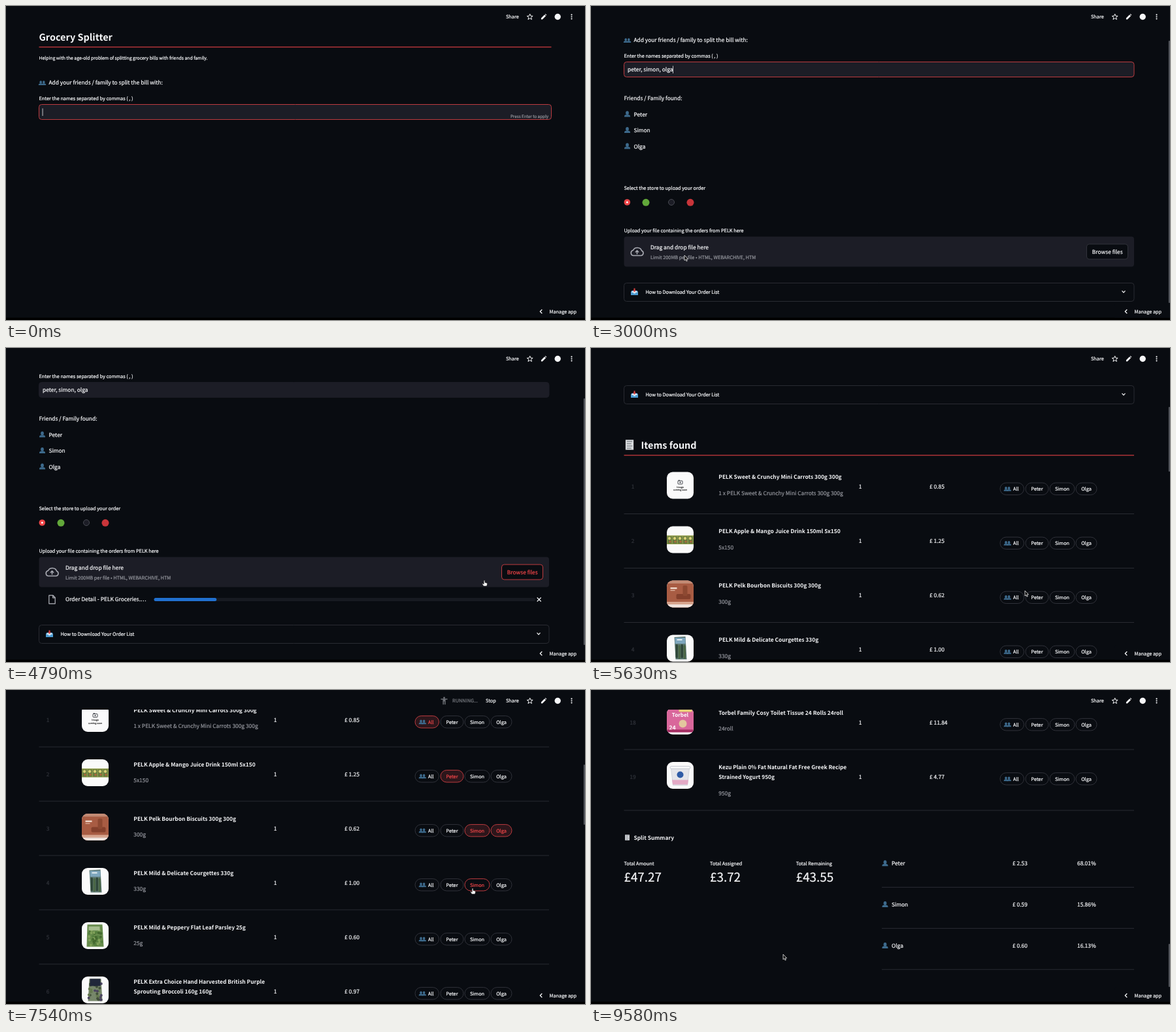
Animation of 886x480 px, one loop 9620 ms. Source, as an HTML page with a canvas:

```html
<!DOCTYPE html>
<html lang="en">
<head>
<meta charset="utf-8">
<title>Grocery Splitter</title>
<style>
html, body { margin: 0; width: 100%; height: 100%; overflow: hidden; background: #090c11; }
canvas { display: block; }
</style>
</head>
<body>
<canvas id="stage" width="886" height="480"></canvas>
<script>
const ctx = document.getElementById('stage').getContext('2d');
ctx.textRendering = 'geometricPrecision';
const LOOP = 9620, TAU = Math.PI * 2;
const FONT = '"Noto Sans CJK JP", "Noto Sans CJK SC", "Noto Sans CJK", "Open Sans", sans-serif';
const BG = '#090c11', PANEL = '#1c1d26', WHITE = '#f6f7f9', GRAY = '#92949b', LINE = '#292b32',
      EDGE = '#30323a', RED = '#ee4548', RED_EDGE = '#bd3b3f', RULE = '#b8363a', BLUE = '#3d6a8c';
const BODY = 9.37, SMALL = 8.2, TINY = 7.03, TITLE = 16.1;

// Type sizes are given for a face in which "name" is 2.377 em wide.
ctx.font = `100px ${FONT}`;
const fontScale = 237.7 / ctx.measureText('name').width;

const PEOPLE = ['Peter', 'Simon', 'Olga'];
const TYPED = PEOPLE.join(', ').toLowerCase();
const STORE = 'PELK';

const ITEMS = [
  ['PELK Sweet & Crunchy Mini Carrots 300g 300g', '1 x PELK Sweet & Crunchy Mini Carrots 300g 300g', '0.85'],
  ['PELK Apple & Mango Juice Drink 150ml 5x150', '5x150', '1.25'],
  ['PELK Pelk Bourbon Biscuits 300g 300g', '300g', '0.62'],
  ['PELK Mild & Delicate Courgettes 330g', '330g', '1.00'],
  ['PELK Mild & Peppery Flat Leaf Parsley 25g', '25g', '0.60'],
  ['PELK Extra Choice Hand Harvested British Purple|Sprouting Broccoli 160g 160g', '160g', '0.97'],
  ['PELK Ripe & Ready Avocados 2pk', '2pk', '1.65'],
  ['PELK Baby Plum Tomatoes 300g', '300g', '1.20'],
  ['PELK Free Range Large Eggs With|Golden Yolks 12pk', '12pk', '2.95'],
  ['PELK Semi Skimmed Milk 2l', '2l', '1.45'],
  ['PELK Mature Cheddar Cheese 400g', '400g', '3.10'],
  ['PELK Wholemeal Medium Sliced|Farmhouse Bread 800g', '800g', '1.30'],
  ['PELK Easy Cook Basmati Rice 1kg', '1kg', '2.20'],
  ['PELK Chicken Breast Fillets 600g', '600g', '4.35'],
  ['PELK Fresh Orange Juice With Juicy|Bits 1l', '1l', '2.40'],
  ['PELK Salted Butter 250g', '250g', '1.99'],
  ['PELK Porridge Oats With Mixed Berries|And Seeds 500g', '500g', '2.78'],
  ['Torbel Family Cosy Toilet Tissue 24 Rolls 24roll', '24roll', '11.84'],
  ['Kezu Plain 0% Fat Natural Fat Free Greek Recipe|Strained Yogurt 950g', '950g', '4.77']
].map(([title, note, price]) => ({ lines: title.split('|'), note, price }));

let nextCentre = 676;
for (const item of ITEMS) {
  item.y = nextCentre;
  item.bottom = item.y + (item.lines.length > 1 ? 51.5 : 41.5);
  nextCentre = item.bottom + 41.5;
}
const SCROLL_END = ITEMS[18].bottom - 184;

const PILLS = [['All', 626, 36.5], [PEOPLE[0], 665, 35], [PEOPLE[1], 702, 38], [PEOPLE[2], 742, 32]];
// time, row, pill
const CLICKS = [[6080, 0, 0], [6400, 1, 1], [6700, 2, 2], [7000, 2, 3], [7800, 3, 1]];

const SCROLL = [[2350, 0], [2800, 65], [4640, 65], [4720, 98], [5100, 98], [5600, 464],
  [7120, 464], [7400, 630.5], [8080, 630.5], [8950, SCROLL_END]];
const THUMB = [[2350, 30, 422], [2800, 53, 454], [4640, 53, 454], [4720, 77, 454], [5000, 77, 454],
  [5100, 45, 145], [5600, 90, 189], [7120, 90, 189], [7400, 114, 206], [8080, 114, 206], [8950, 388, 454]];
const POINTER = [[2080, 700, 100], [2210, 660, 146], [3000, 143, 381], [3150, 143, 381], [3650, 790, 372],
  [4300, 790, 372], [4790, 732, 355], [5100, 732, 355], [5630, 664, 371], [5750, 664, 371], [6050, 645, 213],
  [6110, 645, 213], [6370, 684, 296], [6430, 684, 296], [6670, 721, 379], [6730, 721, 379], [6970, 757, 379],
  [7150, 757, 379], [7540, 714, 303], [7760, 684, 298], [8150, 684, 298], [8950, 294, 404]];

function along(keys, t) {
  const i = keys.findIndex(k => k[0] > t);
  if (i === 0) return keys[0].slice(1);
  if (i < 0) return keys[keys.length - 1].slice(1);
  const a = keys[i - 1], b = keys[i];
  const e = (1 - Math.cos(Math.PI * (t - a[0]) / (b[0] - a[0]))) / 2;
  return a.slice(1).map((v, n) => v + (b[n + 1] - v) * e);
}

// y is the middle of the capitals; a hairline outline thickens the regular weight
function text(str, x, y, size = BODY, color = WHITE, weight = 400, align = 'left') {
  ctx.font = `${weight} ${size * fontScale}px ${FONT}`;
  ctx.fillStyle = ctx.strokeStyle = color;
  ctx.textAlign = align;
  ctx.fillText(str, x, y + size * 0.33);
  if (weight === 400) {
    ctx.lineWidth = 0.22;
    ctx.strokeText(str, x, y + size * 0.33);
  }
}
function rect(x, y, w, h, color) {
  ctx.fillStyle = color;
  ctx.fillRect(x, y, w, h);
}
function box(x, y, w, h, r, fill, stroke, width = 1) {
  ctx.beginPath();
  ctx.roundRect(x, y, w, h, r);
  paint(fill, stroke, width);
}
function disc(x, y, r, fill, stroke, width = 1) {
  ctx.beginPath();
  ctx.arc(x, y, r, 0, TAU);
  paint(fill, stroke, width);
}
function shape(d, x, y, fill, stroke, width = 1) {
  ctx.save();
  ctx.translate(x, y);
  const path = new Path2D(d);
  if (fill) { ctx.fillStyle = fill; ctx.fill(path); }
  if (stroke) { ctx.strokeStyle = stroke; ctx.lineWidth = width; ctx.lineJoin = 'round'; ctx.stroke(path); }
  ctx.restore();
}
function paint(fill, stroke, width) {
  if (fill) { ctx.fillStyle = fill; ctx.fill(); }
  if (stroke) { ctx.strokeStyle = stroke; ctx.lineWidth = width; ctx.stroke(); }
}

function person(x, y, k = 1) {
  ctx.beginPath();
  ctx.ellipse(x, y - 1.5 * k, 2.4 * k, 3 * k, 0, 0, TAU);
  paint(BLUE);
  box(x - 4.5 * k, y + 1.2 * k, 9 * k, 3.3 * k, [2.6 * k, 2.6 * k, 0, 0], BLUE);
}
function couple(x, y) {
  person(x - 2.3, y, 0.75);
  person(x + 2.3, y, 0.75);
}
function sheet(x, y, k) {
  rect(x - 3.6 * k, y - 4.5 * k, 7.2 * k, 9 * k, '#d9dcdf');
  for (let i = 0; i < 4; i++) rect(x - 2.5 * k, y + (i * 2 - 3.3) * k, (i % 2 ? 4 : 5) * k, 0.7 * k, '#777c82');
}
function inbox(x, y) {
  shape('M-5.5 0L-4 -2H4L5.5 0V5H-5.5Z', x, y, '#4d9cd2');
  shape('M-4 -1H4V1H2L1 2.5H-1L-2 1H-4Z', x, y, '#dfe8ee');
  shape('M-1 -5.5H1V-2.5H2.6L0 .3L-2.6 -2.5H-1Z', x, y, '#d9413f');
}
const chevronDown = (x, y) => shape('M-2.5 -1.3L0 1.3L2.5 -1.3', x, y, null, WHITE, 1.2);

function leaves(colors, seed, count) {
  for (let i = 0; i < count; i++) {
    const a = Math.sin(seed + i * 12.9) * 43758, b = Math.sin(seed + i * 78.2) * 9631;
    disc(-10 + (a - Math.floor(a)) * 20, -10 + (b - Math.floor(b)) * 25, 2, colors[i % colors.length]);
  }
}
const ART = {
  0() {
    box(-3.5, -7, 7, 5, 0.8, null, '#30343a', 0.9);
    disc(0, -4.5, 1.1, '#30343a');
    rect(-3, -8.2, 2.5, 1, '#30343a');
    text('Image', 0, 2.5, 4, '#444', 400, 'center');
    text('coming soon', 0, 7, 4, '#444', 400, 'center');
  },
  1() {
    rect(-20.5, -6.5, 41, 13.5, '#8f9a4a');
    for (let i = 0; i < 5; i++) {
      rect(-19.5 + i * 8, -5, 6.5, 11, '#62793f');
      disc(-16.5 + i * 8, -2, 2.2, '#d9cf75');
      disc(-15.5 + i * 8, 3, 1.8, '#a8683c');
    }
  },
  2() {
    rect(-21, -21, 42, 42, '#a85c43');
    rect(-21, -21, 42, 5, '#c28a74');
    rect(-15, -10, 10, 2.4, '#f0d9cc');
    rect(-15, -6, 7, 1.2, '#e2b8a4');
    box(-6, 0, 22, 8, 2, '#84402c');
    box(4, -13, 7, 16, 2, '#8d4932');
    rect(-21, 12, 42, 4, '#d7a58f');
    rect(-21, 16, 42, 5, '#efe3dd');
  },
  3() {
    shape('M-9 -17L8 -18L10 17H-7Z', 0, 0, '#5d7873');
    rect(-8, -16, 16, 9, '#7ea6bd');
    rect(-5, -14, 8, 2, '#e6eff2');
    for (let i = 0; i < 4; i++) box(-7 + i * 4, -6 + i % 2, 3.4, 21, 1.5, i % 2 ? '#4a6645' : '#2f4638');
  },
  4() {
    shape('M-12 -17H11L13 17H-13Z', 0, 0, '#678b4c');
    leaves(['#44692f', '#82a35b', '#55803f'], 3, 34);
    rect(-10, -14, 17, 6, '#a5bd8e');
  },
  5() {
    shape('M-9 -17H9L11 17H-11Z', 0, 0, '#77876a');
    leaves(['#414f39', '#4c4560', '#65794f'], 9, 26);
    rect(-8, -17, 16, 11, '#20273a');
  },
  17() {
    rect(-21, -21, 42, 38, '#d9679b');
    rect(-2, -19, 20, 5, '#e7d179');
    text('Torbel', 0, -9, 9, '#fff', 600, 'center');
    disc(4, 4, 6, '#e3c79e');
    text('24', -12, 10, 10, '#fff', 600, 'center');
    rect(-21, 13, 42, 4, '#a52e63');
  },
  18() {
    shape('M-14 -11H14L11 15H-11Z', 0, 0, '#e4e5ea', '#c3c7d0', 0.7);
    box(-15.5, -14, 31, 4, 2, '#f4f5f7', '#b9bec8', 0.7);
    disc(0, -1, 5, '#2f5ca6');
    shape('M-12.5 7H12.5L11.5 14H-11.5Z', 0, 0, '#e3a9c5');
  }
};
function tile(index, y) {
  ctx.save();
  ctx.translate(136.5, y);
  box(-20.5, -20.5, 41, 41, 9, '#fafafa');
  ctx.clip();
  if (ART[index]) ART[index]();
  else {
    const hue = index * 67 % 360;
    box(-12, -15, 24, 30, 4, `hsl(${hue} 38% 50%)`);
    box(-8, -8, 16, 9, 2, `hsl(${hue} 40% 80%)`);
  }
  ctx.restore();
}

function pill(row, n, y, state) {
  const [label, x, w] = PILLS[n];
  const over = state.px > x && state.px < x + w && Math.abs(state.py + state.scroll - y) < 9.3;
  const on = CLICKS.some(([at, r, p]) => r === row && p === n && state.t >= at);
  if (over) state.hand = true;
  const color = on || over ? RED : WHITE;
  box(x, y - 9.2, w, 18.4, 9.2, on ? '#2c161b' : BG, on || over ? RED_EDGE : EDGE);
  if (n) text(label, x + w / 2, y, SMALL, color, 400, 'center');
  else {
    couple(637.3, y);
    text(label, 646, y, SMALL, color);
  }
}

function drawIntro(t, right, ready) {
  text('Grocery Splitter', 50.5, 48, TITLE, WHITE, 600);
  rect(50.5, 62, right - 50.5, 1.4, RULE);
  text('Helping with the age-old problem of splitting grocery bills with friends and family.', 50.5, 79, 7.62);
  couple(55.5, 117.5);
  text('Add your friends / family to split the bill with:', 65.5, 117);
  text('Enter the names separated by commas ( , )', 50.5, 141, SMALL);
  box(50.5, 150.5, right - 50.5, 23, 4, PANEL, t < 3700 ? RED_EDGE : PANEL);

  const count = t < 130 ? 0 : t < 960 ? Math.ceil((t - 129) / 83) : t < 1130 ? 10 : 11 + Math.floor((t - 1130) / 100);
  const typed = TYPED.slice(0, count);
  text(typed, 56, 162);
  const caretOn = ready ? t < 3700 && (t - 1600) % 1000 < 500 : true;
  if (caretOn) rect(55.6 + ctx.measureText(typed).width, 156.5, 0.9, 11.5, '#d5d6da');
  if (!ready) text('Press Enter to apply', 830, 168.5, TINY, GRAY, 400, 'right');
}

function drawUpload(t, right) {
  text('Friends / Family found:', 50.5, 206);
  PEOPLE.forEach((name, i) => {
    person(55.5, 230 + i * 24.5);
    text(name, 65.5, 230.7 + i * 24.5);
  });

  text('Select the store to upload your order', 50.5, 343.3, SMALL);
  const loaded = t >= 2330;
  disc(55.3, 365, 4.8, RED);
  disc(55.3, 365, 1.5, '#fff');
  disc(loaded ? 123 : 91.2, 365, 4.5, PANEL, '#484a52');
  if (loaded) {
    disc(84, 365.3, 5.5, '#62a83a');
    disc(152, 365.3, 5.5, '#c9353a');
  }

  text(`Upload your file containing the orders from ${STORE} here`, 50.5, 408, SMALL);
  box(50.5, 417.5, right - 50.5, 46, 4, PANEL);
  shape('M-6 6H6.5A4 4 0 0 0 7 -1.6A7 6.5 0 0 0 -6 -2.2A4.2 4.2 0 0 0 -6 6Z', 70.5, 440.5, null, '#a9abb3', 1.6);
  shape('M0 4V-1M-2.6 1L0 -1.6L2.6 1', 70.5, 440.5, null, '#a9abb3', 1.5);
  text('Drag and drop file here', 91, 434.3);
  text('Limit 200MB per file • HTML, WEBARCHIVE, HTM', 91, 449.3, SMALL, GRAY);
  const hot = t >= 3580 && t < 5100;
  box(758.5, 429, 63, 23, 4, BG, hot ? RED_EDGE : EDGE);
  text('Browse files', 790.2, 440.5, BODY, hot ? RED : WHITE, 400, 'center');

  const hasFile = t >= 4640;
  if (hasFile) {
    shape('M-4.7 -6.3H1.5L4.7 -3V6.3H-4.7ZM1.2 -6.3V-2.7H4.7', 70.5, 482.5, null, '#b4b6bd', 1.2);
    text(`Order Detail - ${STORE} Groceries.…`, 91, 482);
    if (t < 5040) {
      const part = t < 4790 ? 0.16 * (t - 4640) / 150 : 0.16 + 0.84 * Math.min(1, (t - 4790) / 210);
      box(226.5, 480, 583.5, 5, 2.5, '#171a21');
      box(226.5, 480, 583.5 * part, 5, 2.5, '#2170cf');
    }
    shape('M-3 -3L3 3M3 -3L-3 3', 815.7, 482.5, null, WHITE, 1.2);
  }
  const y = hasFile ? 535 : 502;
  box(50.5, y - 13.5, right - 50.5, 28, 4, null, LINE);
  inbox(66.5, y);
  text('How to Download Your Order List', 83.5, y + 0.2, SMALL);
  chevronDown(815, y - 0.3);
}

function drawItems(state) {
  sheet(59, 612, 1.7);
  text('Items found', 76.5, 613, TITLE, WHITE, 600);
  rect(50.5, 627.3, 780.5, 1.4, RULE);
  ITEMS.forEach((item, i) => {
    const { y, lines, note, price, bottom } = item;
    if (bottom < state.scroll || y - 45 > state.scroll + 480) return;
    text(i + 1, 64, y, BODY, '#30333a', 400, 'center');
    tile(i, y - 2);
    lines.forEach((line, n) => text(line, 195.3, y - 15 + n * 15.2, BODY, WHITE, 600));
    text(note, 195.3, y + 9.5 + (lines.length - 1) * 15.5, BODY, GRAY);
    text('1', 409.8, y);
    text(`£ ${price}`, 518, y);
    PILLS.forEach((_, n) => pill(i, n, y + 3.3, state));
    rect(50.5, bottom - 0.5, 780.5, 1, LINE);
  });
}

function drawSummary() {
  ctx.save();
  ctx.translate(0, SCROLL_END);
  sheet(55.5, 225.5, 0.95);
  text('Split Summary', 65.5, 225.7, BODY, WHITE, 600);
  [['Amount', '47.27'], ['Assigned', '3.72'], ['Remaining', '43.55']].forEach(([label, sum], i) => {
    const x = 50.5 + i * 131.6;
    text(`Total ${label}`, x, 265, SMALL);
    text(`£${sum}`, x, 286, 21);
  });
  [['2.53', '68.01'], ['0.59', '15.86'], ['0.60', '16.13']].forEach(([sum, share], i) => {
    const y = 265.3 + i * 62.8;
    person(450, y - 0.5);
    text(PEOPLE[i], 460, y);
    text(`£ ${sum}`, 645, y);
    text(`${share}%`, 744, y);
    rect(445, y + 35.8, 386, 1, LINE);
  });
  ctx.restore();
}

function drawChrome(t, ready) {
  rect(0, 0, 886, 30, BG);
  const running = (t >= 5000 && t < 5300) || CLICKS.some(([at]) => t >= at && t < at + 560);
  if (running) {
    disc(670.5, 12, 1.4, '#6f7278');
    shape('M-5 -2.6H5M0 -2.5V1M-1.3 -2V5.8M1.3 -2V5.8', 670.5, 16.5, null, '#6f7278', 1.5);
    text('RUNNING...', 683, 16.7, SMALL, '#74777d');
    text('Stop', 734, 16.7, SMALL);
  }
  text('Share', 765, 16.7, SMALL);
  let star = '';
  for (let i = 0; i < 10; i++) {
    const r = i % 2 ? 2 : 4.7, a = i * TAU / 10;
    star += `${i ? 'L' : 'M'}${r * Math.sin(a)} ${-r * Math.cos(a)}`;
  }
  shape(star + 'Z', 801.7, 16.8, null, WHITE, 1);
  shape('M-3.9 3.9V1.9L1.3 -3.3L3.3 -1.3L-1.9 3.9ZM1.9 -3.9L2.8 -4.6L4.6 -2.8L3.9 -1.9Z', 822.8, 16.5, WHITE);
  disc(844.2, 16.5, 4.7, WHITE);
  for (let i = -1; i < 2; i++) disc(865.5, 16.5 + i * 3.1, 1.05, WHITE);

  if (ready) {
    const [top, bottom] = along(THUMB, t);
    box(883.8, top, 2.2, bottom - top, 1, '#50535a');
  }
  box(801, 454, 85, 22.5, [4, 0, 0, 0], BG);
  shape('M1.5 -3L-1.5 0L1.5 3', 818.8, 467, null, WHITE, 1.3);
  text('Manage app', 831.5, 467.2, SMALL);
}

function drawPointer({ px, py, hand }) {
  if (hand) {
    shape('M-.9 .6Q0 -.6 .9 .6V3.4L4 4.2Q4.8 4.6 4.5 6L3.7 9H-1.2L-3.4 5.6Q-3.2 4.4 -1.9 5.2L-.9 6Z', px, py, '#f4f4f4', '#111', 0.6);
  } else {
    shape('M0 0V8L1.8 6.4L3 9.2L4.3 8.6L3.1 5.9H5.6Z', px, py, '#0a0a0a', '#eee', 0.8);
  }
}

function draw(t) {
  const ready = t >= 2080;
  const right = ready ? 831 : 834.5;
  const [scroll] = along(SCROLL, t);
  const [px, py] = along(POINTER, t);
  const state = { t, scroll, px, py, hand: t > 3580 && t < 4900 };

  rect(0, 0, 886, 480, BG);
  rect(0, 476.5, 886, 3.5, '#000');
  ctx.save();
  ctx.translate(0, -scroll);
  drawIntro(t, right, ready);
  if (ready) drawUpload(t, right);
  if (t >= 5040) {
    drawItems(state);
    drawSummary();
  }
  ctx.restore();
  drawChrome(t, ready);
  if (ready) drawPointer(state);
}

const start = performance.now();
function tick() {
  draw((performance.now() - start) % LOOP);
  requestAnimationFrame(tick);
}
tick();
</script>
</body>
</html>
```
